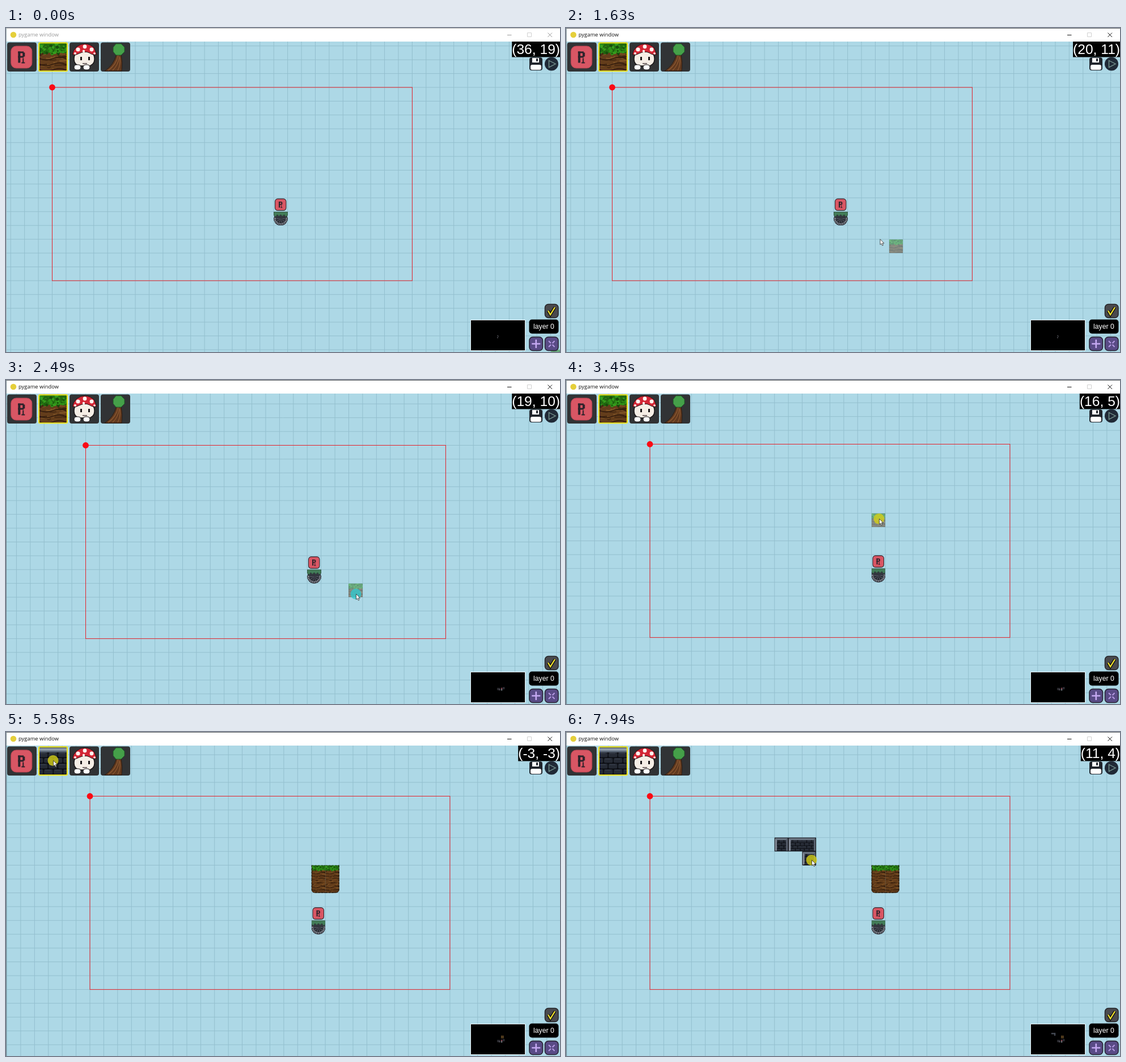
Recreate the animation shown at these times as an HTML page with a canvas. Size 977x573 px, loop 8000 ms.

```html
<!DOCTYPE html>
<html lang="en">
<head>
<meta charset="utf-8">
<title>pygame window</title>
<style>
html, body { margin: 0; width: 100%; height: 100%; overflow: hidden; background: #add8e6; }
canvas { display: block; width: 977px; height: 573px; }
</style>
</head>
<body>
<canvas id="stage" width="977" height="573"></canvas>
<script>
const LOOP = 8000, CELL = 24.42, W = 977, H = 573;
const LAG = 100; // the editor reacts a little later than the pointer
let ctx = document.getElementById('stage').getContext('2d');

// time, x, y
const cameraKeys = [[1900, 81.5, 105], [2490, 140.5, 115.5], [2850, 148, 113.5]];
const pointerKeys = [
  [200, 990, 580], [280, 972, 560], [1000, 650, 432], [1450, 590, 390], [1540, 578, 382],
  [1630, 553.5, 373], [1900, 558, 367.5], [2490, 617, 378], [2850, 624.5, 376],
  [3350, 552, 245], [3520, 552, 245], [3650, 553, 252], [3800, 551, 270], [3950, 574, 272],
  [4150, 574, 250], [4720, 572, 248], [4820, 370, 181], [5090, 210, 130], [5350, 83, 50],
  [5950, 83, 50], [6200, 246, 172], [6290, 258, 176], [6390, 355, 190], [6700, 371.5, 192.5],
  [7050, 371.5, 192.5], [7250, 380, 199], [7400, 405, 198], [7600, 428, 199],
  [7720, 428, 199], [7800, 433, 225], [7900, 433, 226]
];
// column, row, time placed
const dirtTiles = [[16, 5, 3520], [16, 6, 3860], [17, 6, 4020], [17, 5, 4200]];
const brickTiles = [[9, 3, 7120], [10, 3, 7400], [11, 3, 7600], [11, 4, 7870]];
// start, end, colour of pressed-button discs
const presses = [
  [1900, 2880, '#32c8cd'], [3400, 4260, '#d4cf18'], [5450, 5600, '#d4cf18'], [7080, 8000, '#d4cf18']
];
const BRICK_PICKED = 5520;

function along(keys, t) {
  const i = keys.findIndex(k => k[0] > t);
  if (i === 0) return keys[0].slice(1);
  if (i < 0) return keys[keys.length - 1].slice(1);
  const a = keys[i - 1], b = keys[i];
  const u = (t - a[0]) / (b[0] - a[0]), e = u * u * (3 - 2 * u);
  return [a[1] + (b[1] - a[1]) * e, a[2] + (b[2] - a[2]) * e];
}

function rect(x, y, w, h, fill) {
  ctx.fillStyle = fill;
  ctx.fillRect(x, y, w, h);
}
function box(x, y, w, h, r, fill, stroke, width = 1) {
  ctx.beginPath();
  ctx.roundRect(x, y, w, h, r);
  paint(fill, stroke, width);
}
function disc(x, y, r, fill, stroke, width = 1) {
  ctx.beginPath();
  ctx.arc(x, y, r, 0, 7);
  paint(fill, stroke, width);
}
function shape(d, fill, stroke, width = 1) {
  const p = new Path2D(d);
  if (fill) { ctx.fillStyle = fill; ctx.fill(p); }
  if (stroke) { ctx.strokeStyle = stroke; ctx.lineWidth = width; ctx.stroke(p); }
}
function paint(fill, stroke, width) {
  if (fill) { ctx.fillStyle = fill; ctx.fill(); }
  if (stroke) { ctx.strokeStyle = stroke; ctx.lineWidth = width; ctx.stroke(); }
}
function text(s, x, y, font, fill) {
  ctx.font = font;
  ctx.fillStyle = fill;
  ctx.fillText(s, x, y);
}

function texture(draw, w = 48, h = 48) {
  const c = document.createElement('canvas'), main = ctx;
  c.width = w;
  c.height = h;
  ctx = c.getContext('2d');
  let seed = 11;
  draw(() => (seed = seed * 16807 % 2147483647) / 2147483647);
  ctx = main;
  return c;
}

function soil(rnd) {
  rect(0, 0, 48, 48, '#633d1b');
  for (let i = 0; i < 40; i++) {
    const x = rnd() * 48, y = rnd() * 48, w = 6 + rnd() * 12;
    shape(`M${x - w / 2} ${y}q${w / 2} ${rnd() * 6 - 1} ${w} -1`, null,
      ['#3b220f', '#75491f', '#4a2c13', '#815526'][i % 4], 2.4);
  }
  for (let y = 27; y < 48; y += 10) shape(`M0 ${y}q12 5 24 0t24 1`, null, '#341d0d', 1.8);
}
function grass(rnd) {
  rect(0, 0, 48, 17, '#257512');
  for (let i = 0; i < 75; i++) {
    disc(rnd() * 48, rnd() * 19, 1 + rnd() * 2.2, ['#2f9318', '#174d0c', '#37a01f', '#226711'][i % 4]);
  }
}
const soilTexture = texture(soil);
const dirtTexture = texture(rnd => { soil(rnd); grass(rnd); });

function bricks() {
  rect(0, 0, 48, 48, '#0b0d12');
  for (let row = 0; row < 4; row++) {
    for (let x = row % 2 ? -9 : -1; x < 48; x += 17) {
      box(x, 9 + row * 10, 15.5, 8.5, 2, '#252a34');
      rect(x + 2, 10 + row * 10, 10, 1.5, '#343b47');
    }
  }
}
const wallTexture = texture(bricks);
const brickTexture = texture(() => {
  bricks();
  rect(0, 0, 48, 9, '#596574');
  rect(0, 2, 48, 4, '#8d9aa8');
});

const rockTexture = texture(() => {
  ctx.scale(2, 2);
  shape('M0.5 1H23.5V14Q22 24 12 24Q2 24 0.5 14Z', '#33363f');
  for (let i = 0; i <= 10; i++) {
    const a = Math.PI * i / 10, x = 12 + 10 * Math.cos(a), y = 12 + 9.5 * Math.sin(a);
    shape(`M12 13L${x} ${y}`, null, i % 2 ? '#1d2027' : '#555965', 1.2);
    disc(x, y, 2, '#83858f', '#2c2f37', 0.9);
  }
  shape('M0 0.5H24V6L21 9L18 5L15 8L12 5L9 8L6 5L3 9L0 6Z', '#427c58', '#30503f', 0.7);
});

function playerIcon(x, y, size) {
  const u = size / 38;
  ctx.save();
  ctx.translate(x, y);
  ctx.scale(u, u);
  box(0.5, 0.5, 37, 39, 9, '#d95664', u < 1 ? '#30262d' : '#b94552', u < 1 ? 2 : 1);
  for (const r of [[13, 10, 4, 20], [13, 10, 10, 3], [21, 12, 4, 7], [13, 18, 10, 3], [21, 22, 2, 8], [19, 29, 6, 2]]) {
    rect(...r, '#2c222a');
  }
  ctx.restore();
}

function mushroom() {
  box(120, 42, 36, 25, 11, '#f6eee6', '#191516', 1.5);
  shape('M117 47Q118 39 125 33Q131 28 139 28Q149 28 156 36L160 47Q152 48 147 44Q139 40 129 45Q123 49 117 47Z', '#d32635', '#191516', 1);
  for (const [x, y, r] of [[127, 38, 3.6], [139, 33, 3.4], [151, 38, 3.4], [122, 45, 2], [156, 45, 1.8], [137, 41, 2.2]]) {
    disc(x, y, r, '#fff4f0');
  }
  rect(131, 51, 3, 6, '#191516');
  rect(145, 51, 3, 6, '#191516');
  rect(135, 62, 8, 1.5, '#55484a');
  box(120, 65, 12, 9, 4, '#fff', '#191516');
  box(136, 65, 12, 9, 4, '#fff', '#191516');
}

function tree() {
  shape('M174 76Q190 66 195 46L203 46Q206 62 204 76Z', '#60391f', '#2a1b12', 1);
  shape('M180 75Q194 66 198 48M188 75Q198 66 200 50M197 75Q202 66 201 52', null, '#8a5730', 1.4);
  shape('M194 28H203L209 34V42L203 48H194L189 42V34Z', '#45a049', '#1f5a2b', 1);
}

function drawPalette() {
  for (let i = 0; i < 4; i++) box(2 + i * 55, 25.5, 52, 51.5, 4, '#313335');
  playerIcon(8.3, 31.5, 38);
  mushroom();
  tree();
}

function drawButtons() {
  box(923, 52, 23, 23, 4, '#20252c');
  shape('M928 53H940V61H928Z', '#fff');
  rect(935, 54, 3, 5, '#20252c');
  box(925, 65, 19, 9, 3, '#fff');

  disc(962, 63.5, 12, '#202a37');
  shape('M957.5 57.5L969 63.5L957.5 69.5Z', null, '#789690', 1.4);

  box(950.5, 488.5, 23.5, 24, 6, '#4a4a4e', '#242529', 1.5);
  shape('M956 500L960 507L968 494', null, '#111', 5);
  shape('M956 500L960 507L968 494', null, '#f5e52d', 2.2);

  box(922.5, 515.5, 52, 25, 5, '#000');
  text('layer 0', 930, 532, '12.3px "Liberation Sans", sans-serif', '#fff');

  for (const x of [923, 950.5]) box(x, 546.5, 23.5, 24, 6, '#594b86', '#25212f', 1.5);
  shape('M934.8 551V566M927.3 558.5H942.3', null, '#c5a9f2', 2.6);
  shape('M957 553.5L967.5 564M967.5 553.5L957 564', null, '#b69be4', 2);
  disc(962.2, 558.7, 2, '#594b86');
}
const staticUi = texture(() => { drawPalette(); drawButtons(); }, W, H);

function drawTitleBar(active) {
  const ink = active ? '#111' : '#999';
  rect(0, 0, W, 24, '#fff');
  rect(0, 0, W, 1, active ? '#5d6265' : '#b4b4b4');
  rect(0, 0, 1, H, active ? '#71858c' : '#9fb0b6');
  disc(13, 12, 5.3, '#e5cf3b');
  text('pygame window', 22, 15.4, '9.4px "Open Sans", sans-serif', ink);
  shape('M884 12.5H891.5', null, ink, 1);
  shape('M919.5 8.5H926.5V15.5H919.5Z', null, '#d0d0d0', 1);
  shape('M955.5 8.5L963 16M963 8.5L955.5 16', null, ink, 1);
}

function drawGrid([cx, cy]) {
  ctx.beginPath();
  for (let x = cx % CELL; x < W; x += CELL) { ctx.moveTo(x, 24); ctx.lineTo(x, H); }
  for (let y = cy % CELL; y < H; y += CELL) { ctx.moveTo(0, y); ctx.lineTo(W, y); }
  paint(null, '#93bfce', 1);
  ctx.strokeStyle = '#e5222b';
  ctx.strokeRect(cx, cy, 26 * CELL, 14 * CELL);
  disc(cx, cy, 5.4, '#fb0a14');
}

function drawDirt(tiles, cam) {
  const has = (c, r) => tiles.some(k => k[0] === c && k[1] === r);
  for (const [c, r] of tiles) {
    const x = cam[0] + c * CELL, y = cam[1] + r * CELL;
    const left = has(c - 1, r), right = has(c + 1, r), up = has(c, r - 1), down = has(c, r + 1);
    ctx.save();
    ctx.beginPath();
    ctx.roundRect(x, y, CELL, CELL, [1, 1, right || down ? 0 : 6, left || down ? 0 : 6]);
    ctx.clip();
    ctx.drawImage(up ? soilTexture : dirtTexture, x, y, CELL + 0.3, CELL + 0.3);
    ctx.restore();
    ctx.setLineDash([4, 1.5]);
    const a = x + 0.5, b = x + CELL - 0.5, e = y + CELL - 0.5;
    const bend = down ? 0 : 6;
    if (!left) shape(`M${a} ${y}V${e - bend}q0 ${bend} ${bend} ${bend}`, null, '#24180d', 1.2);
    if (!right) shape(`M${b} ${y}V${e - bend}q0 ${bend} ${-bend} ${bend}`, null, '#24180d', 1.2);
    if (!down) shape(`M${left ? x : x + 6} ${e}H${right ? x + CELL : b - 6}`, null, '#24180d', 1.2);
    if (!up) shape(`M${x} ${y + 0.5}h${CELL}`, null, '#1c4a12', 1);
    ctx.setLineDash([]);
  }
}

function drawWall(c, r, span, cam) {
  const x = cam[0] + c * CELL, y = cam[1] + r * CELL, w = span * CELL;
  for (let i = 0; i < span; i++) ctx.drawImage(wallTexture, x + i * CELL, y, CELL, CELL);
  shape(`M${x} ${y}h${w}l-4 4.5h${8 - w}z`, '#6c7683');
  shape(`M${x} ${y}l4 4.5v${CELL - 6}l-4 2z`, '#8a929f');
  shape(`M${x + w} ${y}l-4 4.5v${CELL - 6}l4 2z`, '#59616e');
  ctx.strokeStyle = '#14171d';
  ctx.lineWidth = 1;
  ctx.strokeRect(x + 0.5, y + 0.5, w - 1, CELL - 1);
}

function drawBricks(tiles, cam) {
  if (tiles.length > 0) drawWall(9, 3, 1, cam);
  if (tiles.length > 1) drawWall(10, 3, Math.min(tiles.length - 1, 2), cam);
  if (tiles.length > 3) drawWall(11, 4, 1, cam);
}

function drawMinimap(t, dirt, walls) {
  const u = 2.43;
  rect(819, 516, 97, 55, '#e8eef0');
  rect(820, 517, 95, 53, '#000');
  if (t < 2100) {
    shape('M866 544h2v2l-2 2h2', null, '#5d5d62', 0.9);
  } else {
    rect(866, 544.5, 5, 4, '#29292e');
    rect(869, 546, 2.5, 3, '#44424a');
    rect(872.9, 544.4, u, u, '#8c4a58');
    rect(872.9, 546.8, u, u, '#6f757b');
    rect(876, 543, 3.5, 4, '#292a32');
  }
  for (const [c, r] of dirt) rect(834.1 + c * u, 524.8 + r * u, u, u, '#5b4220');
  for (const [c, r] of walls) rect(834.1 + c * u, 524.8 + r * u, u, u, '#4b505b');
}

function drawReadout(label) {
  ctx.font = '24.6px "Liberation Sans", sans-serif';
  const w = ctx.measureText(label).width;
  rect(W - w, 24, w, 27.5, '#000');
  text(label, W - w, 46.3, ctx.font, '#fff');
}

function drawPointer(x, y) {
  ctx.save();
  ctx.translate(x, y);
  shape('M0.5 0.5V10.2L2.7 8.2L4.3 11.8L6 11L4.4 7.6H7.4Z', '#fff', '#2b2b2b', 0.8);
  ctx.restore();
}

function draw(t) {
  const cam = along(cameraKeys, t), tip = along(pointerKeys, t);
  const oldCam = along(cameraKeys, t - LAG), oldTip = along(pointerKeys, t - LAG);
  const placed = list => list.filter(k => k[2] <= t);
  const dirt = placed(dirtTiles), walls = placed(brickTiles);
  const entered = t >= 380;
  const [col, row] = entered ? [0, 1].map(i => Math.floor((oldTip[i] - oldCam[i]) / CELL)) : [36, 19];
  const picked = t < BRICK_PICKED ? dirtTexture : brickTexture;

  rect(0, 0, W, H, '#add8e6');
  drawGrid(cam);
  playerIcon(cam[0] + 16 * CELL + 2, cam[1] + 8 * CELL + 1.5, 20);
  ctx.drawImage(rockTexture, cam[0] + 16 * CELL, cam[1] + 9 * CELL, CELL, CELL);
  drawDirt(dirt, cam);
  drawBricks(walls, cam);
  if (![...dirt, ...walls].some(k => k[0] === col && k[1] === row)) {
    ctx.globalAlpha = 0.5;
    ctx.drawImage(picked, cam[0] + col * CELL, cam[1] + row * CELL, CELL, CELL);
    ctx.globalAlpha = 1;
  }

  drawTitleBar(t >= 190);
  ctx.drawImage(staticUi, 0, 0);
  ctx.drawImage(picked, 59, 27, 48, 48);
  box(58, 26.3, 50, 50, 2, null, '#f5e91a', 2);
  drawMinimap(t, dirt, walls);
  drawReadout(`(${col}, ${row})`);

  const press = presses.find(p => t >= p[0] && t < p[1]);
  if (press) {
    ctx.globalAlpha = 0.8;
    disc(tip[0], tip[1] + 0.5, 9.5, press[2]);
    ctx.globalAlpha = 1;
  }
  if (t >= 200) drawPointer(...tip);
}

const start = performance.now();
function tick() {
  draw((performance.now() - start) % LOOP);
  requestAnimationFrame(tick);
}
tick();
</script>
</body>
</html>
```
